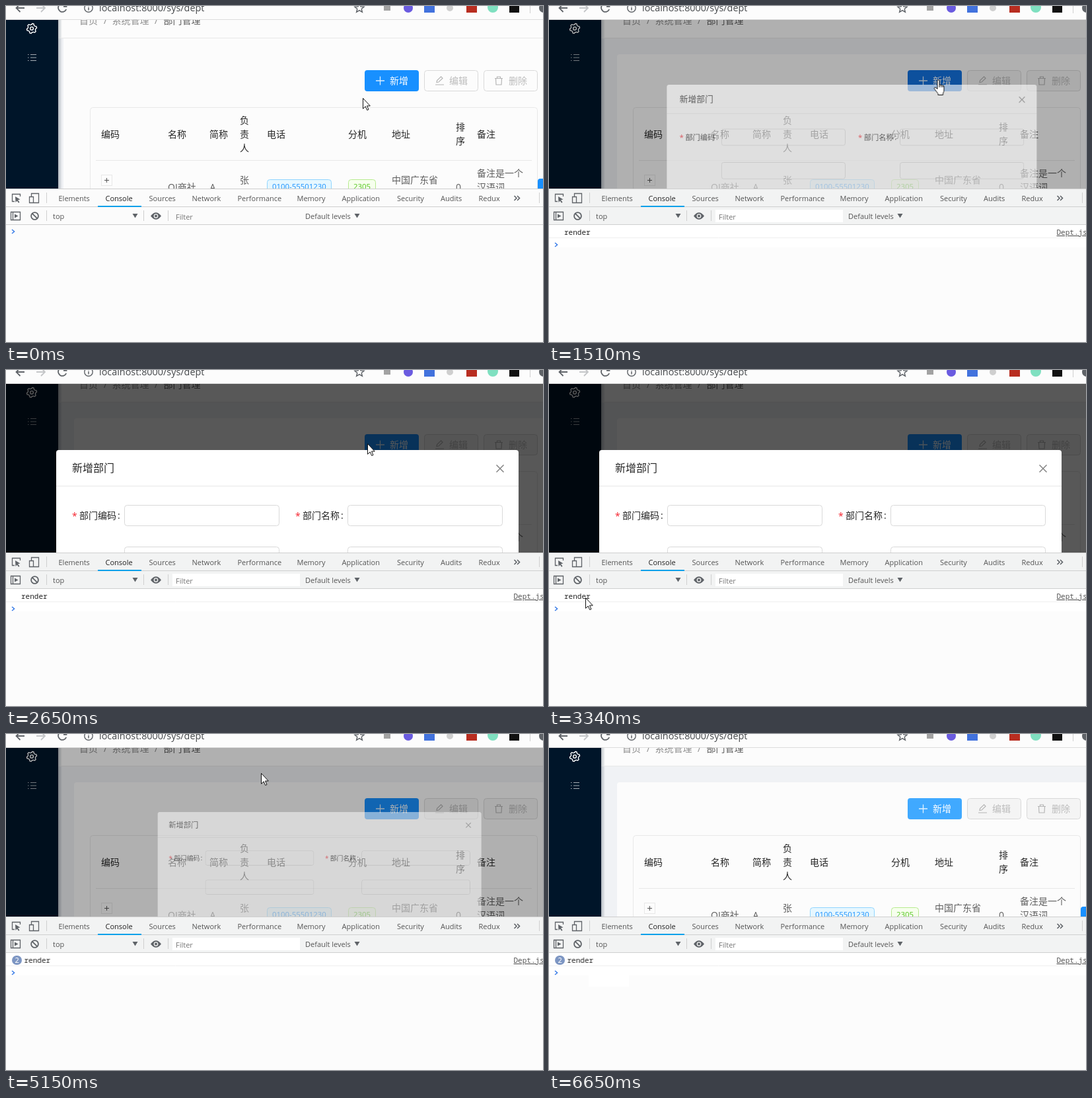
These frames come from a looping animation (813x508 px, 7.18 s). An HTML page:

```html
<!DOCTYPE html>
<html lang="zh-CN">
<head>
<meta charset="utf-8">
<title>Console demo</title>
<style>
html, body { margin: 0; width: 100%; height: 100%; overflow: hidden; background: #fcfcfc; }
svg { display: block; }
text { font: 14px "Open Sans", "Noto Sans CJK SC", "Noto Sans CJK", sans-serif; white-space: pre; }
.head text { fill: #262626; }
.cell text { fill: #5f5f5f; }
.crumb text { fill: #8c8c8c; }
.off text { fill: #bcbcbc; }
.tabs text { font-size: 11px; fill: #555; }
.log text { font: 11px "Noto Sans Mono", "DejaVu Sans Mono", monospace; fill: #222; }
.line { fill: none; stroke: #e8e8e8; }
.icon { fill: none; stroke: #5f6368; stroke-width: 1.3; }
.input { fill: #fff; stroke: #d9d9d9; }
</style>
</head>
<body>
<svg width="813" height="508" viewBox="0 0 813 508">
  <defs>
    <clipPath id="view"><rect y="21" width="813" height="255"/></clipPath>
    <linearGradient id="edge"><stop stop-color="#001529" stop-opacity=".25"/><stop offset="1" stop-color="#001529" stop-opacity="0"/></linearGradient>
  </defs>
  <rect width="813" height="508" fill="#fcfcfc"/>

  <g clip-path="url(#view)">
    <rect x="79" y="21" width="734" height="255" fill="#fcfcfc"/>
    <rect x="79" y="49" width="8" height="227" fill="#f0f2f5"/>
    <rect id="strip" x="87" y="97" width="16" height="179" fill="#f2f3f4"/>
    <path id="backdrop" d="M79 49H813V73H107Q103 73 103 77V276H79Z" fill="#f0f2f5"/>
    <rect x="79" y="21" width="6" height="255" fill="url(#edge)"/>
    <path class="line" d="M82 48.5H813"/>
    <rect y="21" width="79" height="255" fill="#001529"/>
    <g fill="none" stroke="#fff" stroke-width="1.4">
      <path id="gear"/>
      <circle cx="39" cy="34" r="2.4"/>
      <path d="M37 73.5H46M37 78H46M37 82.5H46M33 73.5H34.5M33 78H34.5M33 82.5H34.5" opacity=".65" stroke-width="1.2"/>
    </g>
    <g class="crumb" id="crumb"></g>

    <rect id="add" x="543" y="97" width="82" height="32" rx="4"/>
    <path d="M560 113H573M566.5 106.5V119.5" stroke="#fff" stroke-opacity=".85" stroke-width="1.3"/>
    <text x="581" y="118" fill="#fff">新增</text>
    <g id="disabled" stroke="#d9d9d9">
      <rect x="633.5" y="97.5" width="81" height="31" rx="4"/>
      <rect x="723.5" y="97.5" width="81" height="31" rx="4"/>
    </g>
    <path d="M650 119H663M652 115.5L652.6 112.5 658.6 106.8 661 109.2 655 115Z M740 109.5H752M743.5 109V107H748.5V109M741.5 110L742 119H750L750.5 110" fill="none" stroke="#b5b5b5" stroke-width="1.2"/>
    <g class="off" id="off"></g>

    <rect class="line" x="127.5" y="153.5" width="677" height="160" rx="4"/>
    <path class="line" d="M136 233.5H796"/>
    <g class="head" id="head"></g>
    <rect class="line" x="144.5" y="255.5" width="16" height="16"/>
    <path d="M149 263.5H156M152.5 260V267" stroke="#555"/>
    <g class="cell" id="cells"></g>
    <rect x="395.5" y="262.5" width="97" height="21" rx="4" fill="#e6f7ff" stroke="#91d5ff"/>
    <text x="403" y="277" fill="#1890ff" style="font-size:11.4px">0100-55501230</text>
    <rect x="518.5" y="262.5" width="41" height="21" rx="4" fill="#f6ffed" stroke="#b7eb8f"/>
    <text x="526" y="277" fill="#52c41a" style="font-size:11.4px">2305</text>
    <rect id="handle" x="805" y="261" width="48" height="48" rx="4" fill="#1890ff"/>

    <rect id="mask" y="21" width="813" height="255"/>
    <g id="modal">
      <rect x="76" y="121" width="700" height="500" rx="4" fill="#fff"/>
      <path class="line" d="M76 175.5H776"/>
      <text x="100" y="154" fill="#262626" style="font-size:16px">新增部门</text>
      <path d="M742.5 143.5L753.5 154.5M753.5 143.5L742.5 154.5" stroke="#858585" stroke-width="1.5"/>
      <g id="fields"></g>
      <g class="head" id="labels"></g>
    </g>
  </g>

  <rect width="813" height="20" fill="#fcfcfc"/>
  <path d="M0 20.5H813" stroke="#dcdcdc"/>
  <g fill="none" stroke="#5f6368" stroke-width="1.8">
    <path d="M28 3H15.5M21.5 -3L15.5 3 21.5 9"/>
    <path d="M46 3H59M53 -3L59 3 53 9" stroke="#c4c6c8"/>
    <path d="M90.5 -1A6.3 6.3 0 1 0 91.2 5M91.5 -4V0.8H87"/>
    <circle cx="125" cy="3" r="6.2" stroke-width="1.4"/>
    <path d="M125 2V6.5M125 -1V.5" stroke-width="1.5"/>
    <path d="M535 -4L537 .8 542 1.2 538.2 4.4 539.4 9.2 535 6.6 530.6 9.2 531.8 4.4 528 1.2 533 .8Z" stroke-width="1.4"/>
  </g>
  <text x="141" y="7.5" fill="#44474a" style="font-size:14.4px">localhost:8000/sys/dept</text>
  <rect x="572" y="-3" width="10" height="10" fill="#a2a2a2"/>
  <circle cx="609" cy="3" r="7" fill="#6a5be0"/>
  <rect x="633" y="-5" width="16" height="15" fill="#4272dd"/>
  <circle cx="672" cy="3" r="5" fill="#cfcfcf"/>
  <rect x="697" y="-5" width="16" height="15" fill="#b82d20"/>
  <circle cx="737" cy="2" r="8" fill="#7fe0c0"/>
  <rect x="762" y="-5" width="15" height="15" fill="#111"/>
  <path d="M793.5 0V11" stroke="#d0d0d0"/>
  <circle cx="814" cy="3" r="7" fill="#5f6368"/>

  <rect id="bars" y="276" width="813" height="55"/>
  <path d="M0 276.5H813M0 303.5H813M0 330.5H813M61.5 282V298M807.5 282V298M61.5 309V325M208.5 309V325M245.5 309V325" stroke="#cfcfcf"/>
  <rect x="139" y="302" width="66" height="2" fill="#03a0ea"/>
  <g class="icon">
    <path d="M13 295.5H9.5V284.5H21.5V288"/>
    <path d="M14 288L21.5 292.5 18 293.3 20.5 296.8 19 297.8 16.7 294.4 14.5 297Z" fill="#5f6368" stroke="none"/>
    <path d="M38.5 288V283.5H49.5V297.5H42M35.5 288.5H41.5V297.5H35.5Z"/>
    <path d="M7.5 311.5H21.5V323.5H7.5ZM10.5 311.5V323.5"/>
    <path d="M13 314.5L18.5 317.5 13 320.5Z" fill="#5f6368" stroke="none"/>
    <circle cx="43.5" cy="317.5" r="5.4" stroke-width="1.8"/>
    <path d="M39.6 313.6L47.4 321.4" stroke-width="1.8"/>
    <path d="M219 317.5Q227 307 235 317.5 227 328 219 317.5Z" fill="#5f6368" stroke="none"/>
    <circle cx="227" cy="317.5" r="2.7" fill="#5f6368" stroke="#f3f3f3"/>
    <path d="M769.5 287L773 290.5 769.5 294M774 287L777.5 290.5 774 294" stroke-width="1.6"/>
  </g>
  <path d="M191.5 314H199.5L195.5 320.5ZM527.5 314H535.5L531.5 320.5Z" fill="#5f6368"/>
  <rect id="filter" x="252" y="308" width="193" height="19" fill="#fff"/>
  <g class="tabs" id="tabs"></g>

  <g class="log" id="log">
    <rect y="331" width="813" height="34" fill="#fff"/>
    <path d="M0 350.5H813" stroke="#efefef"/>
    <text id="message" x="23" y="346">render</text>
    <text x="768.5" y="346" text-decoration="underline" style="fill:#555">Dept.js</text>
    <g id="badge">
      <rect x="9" y="335" width="15" height="14" rx="7" fill="#7d96c3"/>
      <text x="13.2" y="346" style="fill:#fff">2</text>
    </g>
  </g>
  <path id="prompt" d="M9 338L12.5 341 9 344" fill="none" stroke="#3d7fe8" stroke-width="1.6"/>
  <rect id="patch" x="60" y="364" width="61" height="18" fill="#fff"/>

  <g id="cursor" stroke="#111" fill="#fff" stroke-linejoin="round">
    <path id="arrow" d="M.5 .5V16.3L4.2 12.9 6.7 18.5 9 17.5 6.5 12H11.3Z"/>
    <path id="hand" transform="translate(-5.5 0)" d="M5.5 1.5Q7 0 8.5 1.5V8.5Q10 7.5 11.2 8.8 12.7 8 13.7 9.4 15.5 9.1 15.5 11V16Q15.5 19 14 21V23.5H6.5V21.5L1.2 14.5Q.2 12.8 1.6 12.2 2.8 11.8 4 13.1L5.5 14.5ZM8.5 8.5V12M11.2 8.8V12M13.7 9.4V12"/>
  </g>
</svg>
<script>
const LOOP = 7180;
const $ = id => document.getElementById(id);

function svg(parent, tag, attrs, content = '') {
  const el = document.createElementNS('http://www.w3.org/2000/svg', tag);
  for (const key in attrs) el.setAttribute(key, attrs[key]);
  el.textContent = content;
  $(parent).append(el);
}

// Each row: x, vertical centre, then the text
function write(parent, rows, drop = 5) {
  for (const [x, y, content] of rows) svg(parent, 'text', {x, y: y + drop}, content);
}

write('crumb', [[111, 22, '首页'], [148, 22, '/'], [160.5, 22, '系统管理'], [225, 22, '/']]);
svg('crumb', 'text', {x: 238.5, y: 27, style: 'fill:#5a5a5a'}, '部门管理');
write('off', [[671, 113, '编辑'], [761, 113, '删除']]);
write('head', [
  [144, 194, '编码'], [245, 194, '名称'], [308, 194, '简称'],
  [354, 173, '负'], [354, 194, '责'], [354, 215, '人'],
  [395, 194, '电话'], [518, 194, '分机'], [584, 194, '地址'],
  [681, 183, '排'], [681, 204, '序'], [713, 194, '备注']
]);
write('cells', [
  [245, 274, 'QJ商社'], [308.5, 274, 'A'], [354, 263, '张'],
  [584, 263, '中国广东省'], [681, 274, '0'], [713, 253, '备注是一个'], [713, 274, '汉语词']
]);
write('tabs', [
  [79.5, 290, 'Elements'], [216.5, 290, 'Sources'], [281.5, 290, 'Network'],
  [350.5, 290, 'Performance'], [440.5, 290, 'Memory'], [508.5, 290, 'Application'],
  [592, 290, 'Security'], [658, 290, 'Audits'], [715.5, 290, 'Redux'],
  [71, 317, 'top'], [453, 317, 'Default levels']
]);
svg('tabs', 'text', {x: 150.5, y: 295, style: 'fill:#222'}, 'Console');
svg('tabs', 'text', {x: 257, y: 322.5, style: 'fill:#777'}, 'Filter');

for (const [x, label] of [[100, '部门编码'], [438, '部门名称']]) {
  for (const y of [204.5, 267.5])
    svg('fields', 'rect', {class: 'input', x: x + 79.5, y, width: 234, height: 31, rx: 4});
  svg('labels', 'text', {x, y: 226, style: 'fill:#f5222d'}, '*');
  write('labels', [[x + 11, 220, label], [x + 69, 220, ':']]);
}

const gear = [];
for (let i = 0; i < 24; i++) {
  const angle = (i + .5) * Math.PI / 12, r = i % 4 < 2 ? 7.6 : 5.8;
  gear.push(`${39 + r * Math.sin(angle)} ${34 - r * Math.cos(angle)}`);
}
$('gear').setAttribute('d', `M${gear.join('L')}Z`);

// Holds every value until the next time in the table
function play(id, property, rows) {
  const frames = rows.map(([time, value]) =>
    ({offset: time / LOOP, [property]: value, easing: 'steps(1, end)'}));
  frames.push({offset: 1, [property]: rows[rows.length - 1][1]});
  $(id).animate(frames, {duration: LOOP, iterations: Infinity});
}

const move = (x, y) => `translate(${x}px, ${y}px)`;
const zoom = s => `translate(588px, 112px) scale(${s}) translate(-588px, -112px)`;
const showAt = (id, time) => play(id, 'opacity', [[0, 0], [time, 1]]);

play('cursor', 'transform', [
  [0, 540, 139], [250, 540, 138], [400, 561, 138], [550, 592, 106], [670, 596, 120],
  [820, 588, 111], [1630, 587, 112], [2650, 547, 111], [2800, 213, 339], [2950, 66, 340],
  [3100, 62, 343], [3220, 57, 344], [3340, 55, 344], [3770, 57, 345], [4340, 63, 345],
  [4480, 254, 108], [4630, 350, 75], [4760, 386, 59], [5420, 180, 260], [5560, 96, 325],
  [5690, 65, 340], [5830, 72, 339], [5950, 60, 339], [6530, 109, 363]
].map(([time, x, y]) => [time, move(x, y)]));
play('cursor', 'opacity', [[0, 1], [6650, 0]]);
play('hand', 'opacity', [[0, 0], [670, 1], [1630, 0]]);
play('arrow', 'opacity', [[0, 1], [670, 0], [1630, 1]]);

play('add', 'fill', [[0, '#1890ff'], [820, '#40a9ff'], [1240, '#1272e0'], [1780, '#1890ff'], [5270, '#40a9ff']]);
play('disabled', 'fill', [[0, '#fcfcfc'], [1240, '#f4f4f4']]);
play('handle', 'opacity', [[0, 1], [1240, 0], [5270, 1]]);
showAt('strip', 1240);
showAt('backdrop', 1510);
play('mask', 'opacity', [[0, 0], [1510, .3], [1630, .65], [5150, .3], [5270, 0]]);
play('modal', 'opacity', [[0, 0], [1510, .6], [1630, 1], [5150, .5], [5270, 0]]);
play('modal', 'transform', [[0, zoom(.2)], [1510, zoom(.8)], [1630, zoom(.998)], [1780, zoom(1)], [5150, zoom(.7)], [5270, zoom(.2)]]);

play('bars', 'fill', [[0, '#fbfbfb'], [1360, '#f2f3f3']]);
showAt('filter', 1360);
showAt('log', 1360);
showAt('badge', 5030);
showAt('patch', 6530);
play('message', 'transform', [[0, move(0, 0)], [5030, move(4.5, 0)]]);
play('prompt', 'transform', [[0, move(0, 0)], [1360, move(0, 20)]]);
</script>
</body>
</html>
```
